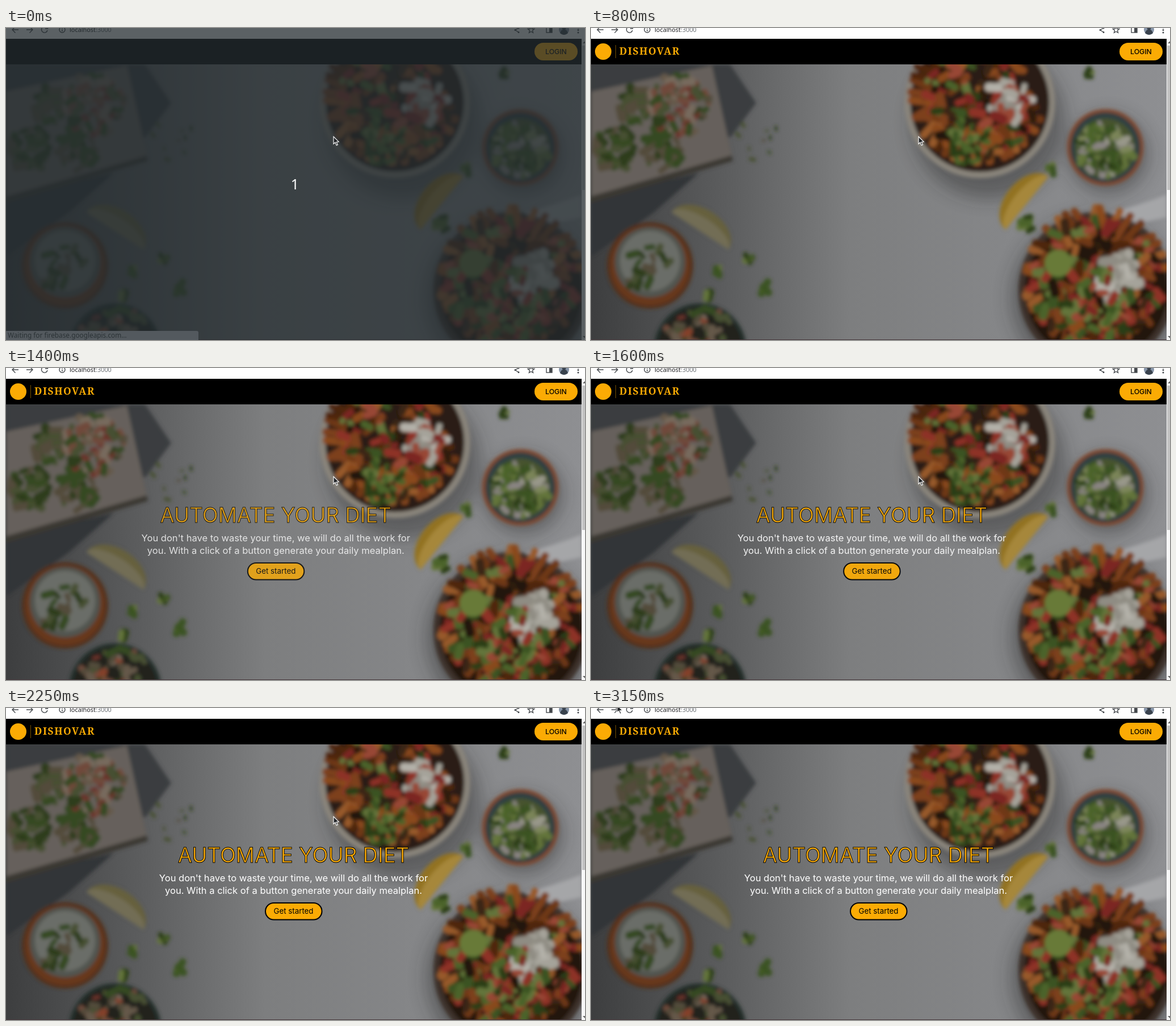
Write an HTML page that moves like this. It is 1020 px wide and 549 px high and loops after 3350 ms.

```html
<!DOCTYPE html>
<html lang="en">
<head>
<meta charset="utf-8">
<title>Meal planner landing page</title>
<style>
html, body { margin: 0; width: 100%; height: 100%; overflow: hidden; background: #fff; }
svg { display: block; }
.ui { font-family: Inter, "Open Sans", sans-serif; text-anchor: middle; }
.chrome { font-family: "Noto Sans", "Open Sans", sans-serif; }
.brand { font: 900 17.5px "Noto Serif", serif; letter-spacing: 1.5px; }
.icons { fill: none; stroke: #45494d; stroke-width: 1.4; }
.dots { stroke-width: 3; stroke-linecap: round; }
</style>
</head>
<body>
<svg width="1020" height="549" viewBox="0 0 1020 549">
  <defs>
    <clipPath id="photoClip"><rect y="64" width="1014" height="485"/></clipPath>
    <filter id="soft" x="0" y="0" width="1020" height="600" filterUnits="userSpaceOnUse"><feGaussianBlur stdDeviation="3"/></filter>
    <filter id="shadow" x="0" y="0" width="1020" height="600" filterUnits="userSpaceOnUse"><feGaussianBlur stdDeviation="16"/></filter>
    <linearGradient id="table">
      <stop offset="0" stop-color="#3d3e3f"/><stop offset=".25" stop-color="#5e5f60"/>
      <stop offset=".45" stop-color="#7d7e7f"/><stop offset="1" stop-color="#8e8f92"/>
    </linearGradient>
  </defs>

  <g clip-path="url(#photoClip)">
    <rect y="64" width="1014" height="485" fill="url(#table)"/>
    <g id="shadows" filter="url(#shadow)" opacity=".4"></g>
    <g id="photo" filter="url(#soft)"></g>
    <rect y="548" width="1014" height="1" fill="#45373b"/>
  </g>

  <g id="hero" class="ui">
    <text x="506.5" y="272" font-size="36.6" fill="#fbab04" stroke="#000" stroke-width=".9">AUTOMATE YOUR DIET</text>
    <g font-size="16.55" fill="#fff">
      <text x="506.5" y="304.5">You don't have to waste your time, we will do all the work for</text>
      <text x="506.5" y="326.5">you. With a click of a button generate your daily mealplan.</text>
    </g>
    <rect x="457" y="343" width="99.5" height="29.5" rx="14.75" fill="#fbab04" stroke="#000" stroke-width="2"/>
    <text x="506.5" y="362" font-size="13.3">Get started</text>
  </g>

  <rect y="19" width="1014" height="45"/>
  <g id="brand" fill="#fbab04">
    <circle cx="21.5" cy="41.5" r="14.5"/>
    <rect x="43" y="30" width="1" height="23" opacity=".45"/>
    <text class="brand" x="50" y="47">DISHOVAR</text>
  </g>
  <rect x="931" y="26" width="76" height="31" rx="15.5" fill="#fbab04"/>
  <text class="ui" x="969" y="45.5" font-size="12.3" font-weight="500">LOGIN</text>

  <rect width="1020" height="19" fill="#fff"/>
  <g class="icons">
    <path d="M22 3H11M16.500 -2.500L11 3L16.500 8.500M36 3H47M41.500 -2.500L47 3L41.500 8.500"/>
    <path d="M71.500 -1A5.300 5.300 0 1 0 73 4M73.500 -3V1H69"/>
    <circle cx="99" cy="3" r="5"/><path d="M99 2.500V6M99 0V1.200"/>
    <path d="M903 0L897 3.500L903 7.500"/>
    <path id="star"/>
    <rect x="952" y="-2" width="10" height="10"/><path d="M959.500 -2V8" stroke-width="5"/>
    <path class="dots" d="M903 0h0M897 3.500h0M903 7.500h0M1008 -1h0M1008 3.500h0M1008 8h0"/>
  </g>
  <circle cx="983" cy="3" r="9" fill="#8795a8"/>
  <path d="M976 9Q978 3 981 3A3.500 3.500 0 1 1 985 3Q988 3 990 9Q983 15 976 9Z" fill="#39424d"/>
  <text class="chrome" x="112" y="7" font-size="10.9" fill="#202124">localhost<tspan fill="#6b7075">:3000</tspan></text>

  <rect x="1014" y="19" width="6" height="530" fill="#f8f8f8"/>
  <rect x="1015" y="31" width="5" height="254" fill="#c2c2c2"/>
  <path d="M1016 27L1020 23V27ZM1016 542H1020V546Z" fill="#606060"/>

  <g id="status">
    <path d="M0 533H336Q339 533 339 536V549H0Z" fill="#dee1e6"/>
    <text class="chrome" x="3" y="545" font-size="11.8" fill="#3c4043">Waiting for firebase.googleapis.com…</text>
  </g>
  <g id="countdown">
    <rect width="1020" height="549" fill="#252c30" opacity=".75"/>
    <text class="chrome" x="509" y="284" font-size="25" fill="#fff" text-anchor="middle">1</text>
  </g>
  <path id="cursor" d="M0 0V13L3 10.300L5.200 15.500L7.400 14.500L5.200 9.500L9.200 9.300Z" fill="#222528" stroke="#fff" stroke-width="1.1"/>
</svg>
<script>
const $ = id => document.getElementById(id);
const LOOP = 3350, TICK = 50;

// Soft food photograph
let seed = 11;
const random = () => (seed = seed * 16807 % 2147483647) / 2147483647;
const pick = list => list[Math.floor(random() * list.length)];
const repeat = (count, make) => Array.from({ length: count }, (_, i) => make(i)).join('');
const disc = (x, y, r, fill) => `<circle cx="${x}" cy="${y}" r="${r}" fill="${fill}"/>`;
const shape = (d, fill) => `<path d="${d}" fill="${fill}"/>`;
const bowl = (x, y, r, rim, inside) => disc(x, y, r, rim) + disc(x, y, r * .92, inside);
const piece = (x, y, length, width, angle, fill) =>
  `<rect x="${-length / 2}" y="${-width / 2}" width="${length}" height="${width}" rx="${width * .4}" fill="${fill}" transform="translate(${x} ${y}) rotate(${angle})"/>`;

// Random bits spread evenly over a disc
const heap = (x, y, r, count, size, colors) => repeat(count, () => {
  const a = random() * Math.PI * 2, d = Math.sqrt(random()) * r;
  const length = size * (.6 + random() * .7);
  return piece(x + Math.cos(a) * d, y + Math.sin(a) * d, length, length * .5, random() * 180, pick(colors));
});

// Fries lying along the rim, pointing outward, between two angles
const fries = (x, y, r, from, to) => repeat(24, i => {
  const angle = from + (to - from) * i / 23, a = angle * Math.PI / 180;
  return piece(x + Math.cos(a) * r, y + Math.sin(a) * r, 62, 13, angle + random() * 50 - 25, pick(FRIES));
});

const wedge = (x, y, half, angle, peel, flesh) =>
  `<g transform="translate(${x} ${y}) rotate(${angle})">` +
  shape(`M${-half} 0A${half} ${half * .65} 0 0 1 ${half} 0Z`, peel) +
  shape(`M${-half} 0A${half} ${half * .4} 0 0 1 ${half} 0Z`, flesh) + '</g>';

const FRIES = ['#8a4a1f', '#6e3718', '#985a2a', '#50280f', '#7d401b'];
const GREENS = ['#3b5220', '#4c6429', '#2b3d19', '#63753a'];
const REDS = ['#8e3028', '#7b2821', '#984735'];
const CREAM = ['#a5a39a', '#b3b1a9', '#8f8c83'];
const DARK = ['#20150e', '#2d1c10', '#3b2514'];
const MIXED = [...FRIES, ...GREENS, ...REDS, ...DARK];
// Muted versions for the shaded left side
const HERBS = ['#2d3c1c', '#364922', '#465030', '#524b3b'];
const TOPPING = [...HERBS, '#6a3129', '#70483a', '#776a5d', '#655849'];

$('shadows').innerHTML = disc(700, 165, 135, '#222') + disc(912, 222, 70, '#222') + disc(885, 475, 145, '#222');
$('photo').innerHTML = [
  // Cloth and serving board
  shape('M0 64H245L291 132L246 192L0 230Z', '#3b3d40'),
  shape('M0 300L190 255L110 325L0 402Z', '#313437'),
  shape('M0 112L213 66L250 234L0 308Z', '#3b3733'),
  shape('M0 112L213 66L248 224L0 296Z', '#66615c'),
  heap(80, 138, 30, 24, 26, HERBS), heap(42, 212, 36, 32, 26, HERBS),
  heap(126, 214, 36, 32, 26, HERBS), heap(155, 136, 54, 80, 22, TOPPING),
  // Left bowls and lemon
  bowl(104, 418, 76, '#53301d', '#68371f'), disc(104, 412, 62, '#51544f'), disc(104, 410, 53, '#6b6d68'),
  heap(92, 415, 45, 18, 24, HERBS),
  wedge(192, 357, 60, 33, '#66603c', '#726d55'),
  bowl(192, 566, 82, '#26332e', '#20211c'), heap(192, 552, 62, 70, 22, [...TOPPING, '#84502b', '#85402a']),
  // Upper bowl
  bowl(685, 131, 133, '#8a857c', '#2b1c13'),
  fries(682, 118, 94, 25, 225), heap(685, 125, 100, 170, 25, MIXED),
  heap(735, 130, 38, 32, 26, [...CREAM, ...CREAM, ...REDS]), heap(665, 205, 38, 22, 24, GREENS),
  // Side bowl
  bowl(906, 210, 67, '#834629', '#2f4142'), disc(906, 212, 53, '#46522f'),
  heap(906, 212, 47, 75, 20, [...GREENS, '#7d865a', '#99988a', '#8a8483']),
  // Right lemon and folded cloth
  wedge(768, 308, 60, -51, '#927220', '#a6873a'), heap(770, 345, 14, 8, 20, GREENS),
  shape('M915 325Q970 311 1014 293V333L948 347Z', '#a5a6a8'),
  // Lower right bowl
  bowl(890, 461, 137, '#3d332b', '#24160d'),
  fries(890, 440, 100, 110, 350), heap(888, 452, 114, 210, 27, MIXED),
  disc(823, 414, 24, '#687a38'),
  heap(928, 436, 38, 45, 30, CREAM), heap(900, 480, 52, 36, 24, [...REDS, ...GREENS]),
  // Loose leaves and crumbs
  ...[[875, 80], [278, 405], [305, 455], [808, 250], [224, 428], [205, 467]].map(([x, y]) => heap(x, y, 7, 4, 19, GREENS)),
  heap(295, 195, 38, 9, 10, HERBS)
].join('');

$('star').setAttribute('d', 'M' + Array.from({ length: 10 }, (_, i) => {
  const a = i * Math.PI / 5, r = i % 2 ? 2.7 : 6;
  return [925 + r * Math.sin(a), 3.5 - r * Math.cos(a)];
}).join('L') + 'Z');

// CSS "ease": cubic-bezier(.25, .1, .25, 1)
function ease(x) {
  let low = 0, high = 1;
  for (let i = 0; i < 24; i++) {
    const u = (low + high) / 2;
    if (.75 * u * (1 - u) + u ** 3 < x) low = u; else high = u;
  }
  const u = low;
  return .3 * u * (1 - u) ** 2 + 3 * u * u * (1 - u) + u ** 3;
}
const clamp = x => Math.max(0, Math.min(1, x));
const mix = (a, b, p) => a + (b - a) * p;

function cursorAt(t) {
  const travel = clamp((t - 2450) / 550), nudge = clamp((t - 3000) / 150);
  const s = travel * travel * (3 - 2 * travel);
  return [mix(577, 54, s) - 8 * nudge, mix(191, -1, s) - 4 * nudge];
}

function render(t) {
  // The entrance pauses between 1800 and 2050 ms.
  const clock = t < 2050 ? Math.min(t, 1800) : t - 250;
  const shown = ease(clamp((clock - 800) / 1200));
  $('hero').setAttribute('transform', `translate(${-158 * (1 - shown)} 0)`);
  $('hero').setAttribute('opacity', shown);
  $('brand').setAttribute('visibility', t >= 550 ? 'visible' : 'hidden');
  $('status').setAttribute('visibility', t < 200 ? 'visible' : 'hidden');
  $('countdown').setAttribute('opacity', clamp(1 - t / 200));
  $('cursor').setAttribute('transform', `translate(${cursorAt(t).join(' ')})`);
}

const start = performance.now();
function frame() {
  const t = (performance.now() - start) % LOOP;
  render(Math.floor(t / TICK) * TICK);
  requestAnimationFrame(frame);
}
frame();
</script>
</body>
</html>
```
